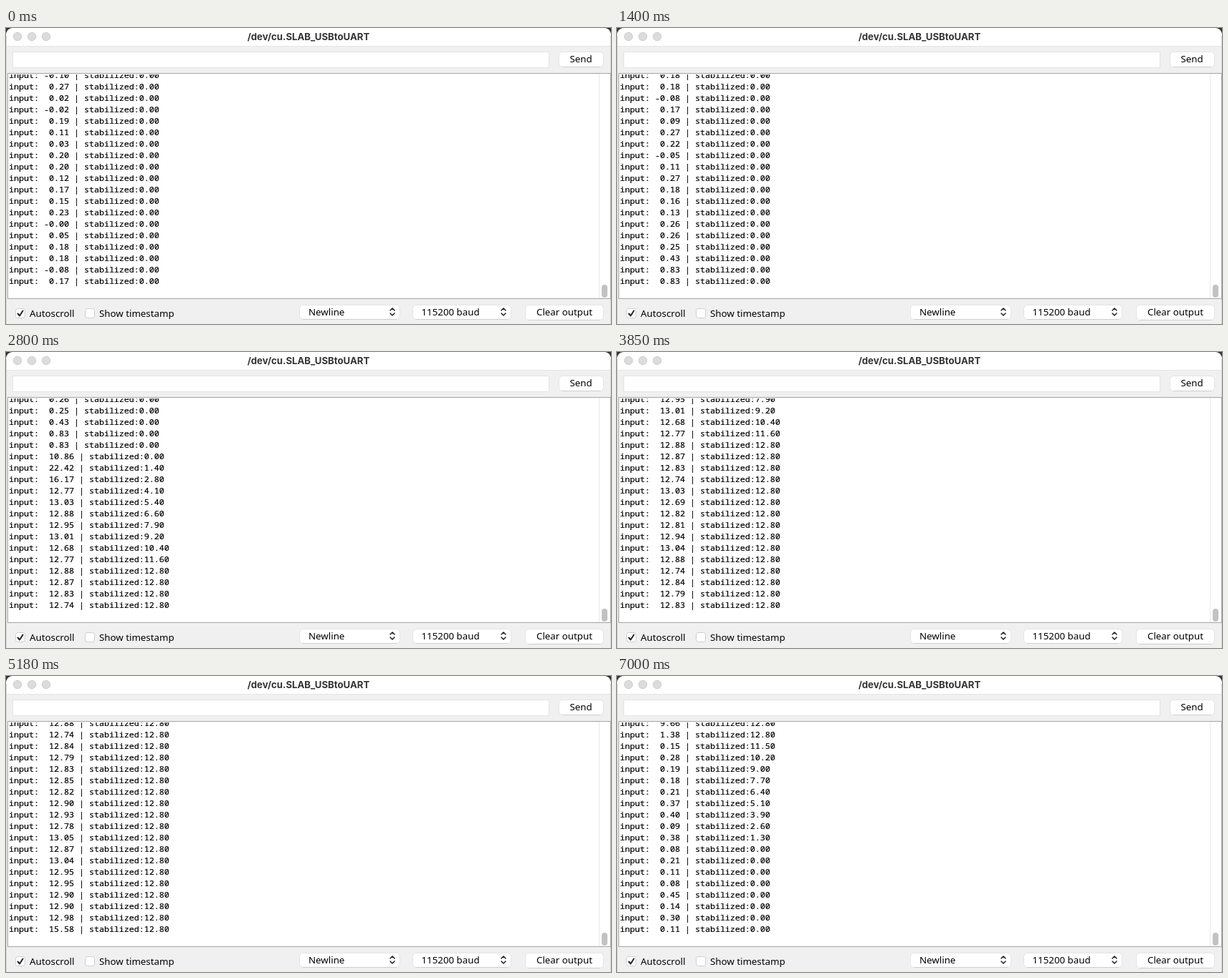
These frames come from a looping animation (844 by 414 pixels, 7.07 s). An HTML page:

```html
<!DOCTYPE html>
<html lang="en">
<head>
<meta charset="utf-8">
<title>Serial monitor</title>
<style>
  html, body { margin: 0; width: 100%; height: 100%; overflow: hidden; background: #f0f0f0; }
  svg { display: block; }
  text { font: 13.3px "Noto Sans", "Open Sans", sans-serif; fill: #000; white-space: pre; }
  #log text { font: 11.667px "Noto Sans Mono", "DejaVu Sans Mono", monospace; stroke: #000; stroke-width: .2; }
  .title { font: bold 13.2px Inter, sans-serif; fill: #333; text-anchor: middle; }
  .lights { fill: #dcdcdc; stroke: #cdcdcd; }
  .control { fill: #fff; stroke: #e4e4e4; }
  .shade { stroke: #cecece; }
  .mark { fill: none; stroke: #222; stroke-linecap: round; stroke-linejoin: round; }
</style>
</head>
<body>
<svg width="844" height="414" viewBox="0 0 844 414">
  <defs>
    <clipPath id="view"><rect x="3" y="65" width="824" height="313"/></clipPath>
    <path id="arrows" class="mark" stroke-width="1.5" d="M-3-2 0-5 3-2M-3 2 0 5 3 2"/>
  </defs>

  <!-- window and title bar -->
  <path fill="#333" d="M0 0H10L0 10ZM844 0H834L844 10Z"/>
  <path fill="#f0f0f0" d="M0 414V10Q1 0 10 0H834Q843 0 844 10V414Z"/>
  <path fill="#fff" d="M0 25V10Q1 0 10 0H834Q843 0 844 10V25Z"/>
  <path stroke="#e6e6e6" d="M1 25.5H843"/>
  <path stroke="#d4d4d4" d="M.5 10V414M843.5 10V414"/>
  <g class="lights">
    <circle cx="16" cy="12" r="5.7"/><circle cx="36" cy="12" r="5.7"/><circle cx="56" cy="12" r="5.7"/>
  </g>
  <text class="title" x="422" y="16.5">/dev/cu.SLAB_USBtoUART</text>

  <!-- input row -->
  <rect class="control" x="9.5" y="33.5" width="748" height="22"/>
  <rect class="control" x="771.5" y="33.5" width="62" height="21" rx="5"/>
  <path class="shade" d="M776 54.5H829"/>
  <text x="786.5" y="48">Send</text>

  <!-- log area -->
  <rect x="2.5" y="63.5" width="841" height="315" fill="#fff" stroke="#a4a4a4"/>
  <path stroke="#e8e8e8" d="M827.5 64V378"/>
  <rect x="831" y="359" width="8" height="18" rx="4" fill="#c2c2c2"/>
  <g id="log" clip-path="url(#view)"></g>

  <!-- bottom bar -->
  <rect class="control shade" x="13.5" y="392.5" width="13" height="13" rx="3"/>
  <path class="mark" stroke-width="2" d="M16.5 399.5 19 402.5 23.5 395.5"/>
  <text x="33" y="404">Autoscroll</text>
  <rect class="control shade" x="110.5" y="392.5" width="13" height="13" rx="3"/>
  <text x="130" y="404">Show timestamp</text>
  <rect class="control" x="409.5" y="387.5" width="140" height="20" rx="5"/>
  <path class="shade" d="M414 407.5H545"/>
  <text x="422" y="402">Newline</text>
  <use href="#arrows" x="539" y="397"/>
  <rect class="control" x="567.5" y="387.5" width="137" height="20" rx="5"/>
  <path class="shade" d="M572 407.5H700"/>
  <text x="579.5" y="402">115200 baud</text>
  <use href="#arrows" x="694" y="397"/>
  <rect class="control" x="724.5" y="387.5" width="109" height="21" rx="5"/>
  <path class="shade" d="M729 408.5H829"/>
  <text x="740" y="402">Clear output</text>
</svg>
<script>
const LOOP = 7070, TICK = 70, LINES_PER_TICK = 0.73;
const ROWS = 19, COUNT = 92;
const NOISE = 0.2, WINDOW = 10, CEILING = 13.5;

// Sensor load as [line, value]: idle, a spike up to a plateau, then release
const load = [[0, 0.1], [29, 0.1], [33, 0.9], [34, 11], [35, 22.5], [36, 16.2], [37, 12.85],
  [71, 12.9], [72, 15.4], [73, 9.7], [74, 1.3], [75, 0.25], [COUNT, 0.25]];

function loadAt(i) {
  const k = load.findIndex(([x]) => x > i);
  const [x0, y0] = load[k - 1], [x1, y1] = load[k];
  return y0 + (y1 - y0) * (i - x0) / (x1 - x0);
}

let seed = 7;
function random() {
  seed = seed * 16807 % 2147483647;
  return seed / 2147483647;
}

const inputs = Array.from({ length: COUNT }, (_, i) => loadAt(i) + NOISE * (2 * random() - 1));

// Mean of the preceding samples; small readings count as zero, small changes are ignored
let steady = 0;
const lines = inputs.map((v, i) => {
  const past = inputs.slice(Math.max(0, i - WINDOW), i);
  const mean = past.reduce((sum, x) => sum + Math.min(x, CEILING), 0) / WINDOW;
  const next = mean < 1 ? 0 : Math.round(mean * 10) / 10;
  if (Math.abs(next - steady) > 0.25) steady = next;
  return `input: ${v < 0 ? "" : " "}${v.toFixed(2)} | stabilized:${steady.toFixed(2)}`;
});

const log = document.getElementById("log");
const rows = Array.from({ length: ROWS }, (_, i) => {
  const row = document.createElementNS("http://www.w3.org/2000/svg", "text");
  row.setAttribute("x", 4);
  row.setAttribute("y", 70 + 16 * i);
  return log.appendChild(row);
});

function draw() {
  const tick = Math.floor(performance.now() % LOOP / TICK);
  const first = Math.round(tick * LINES_PER_TICK);
  rows.forEach((row, i) => row.textContent = lines[first + i]);
  requestAnimationFrame(draw);
}
draw();
</script>
</body>
</html>
```
